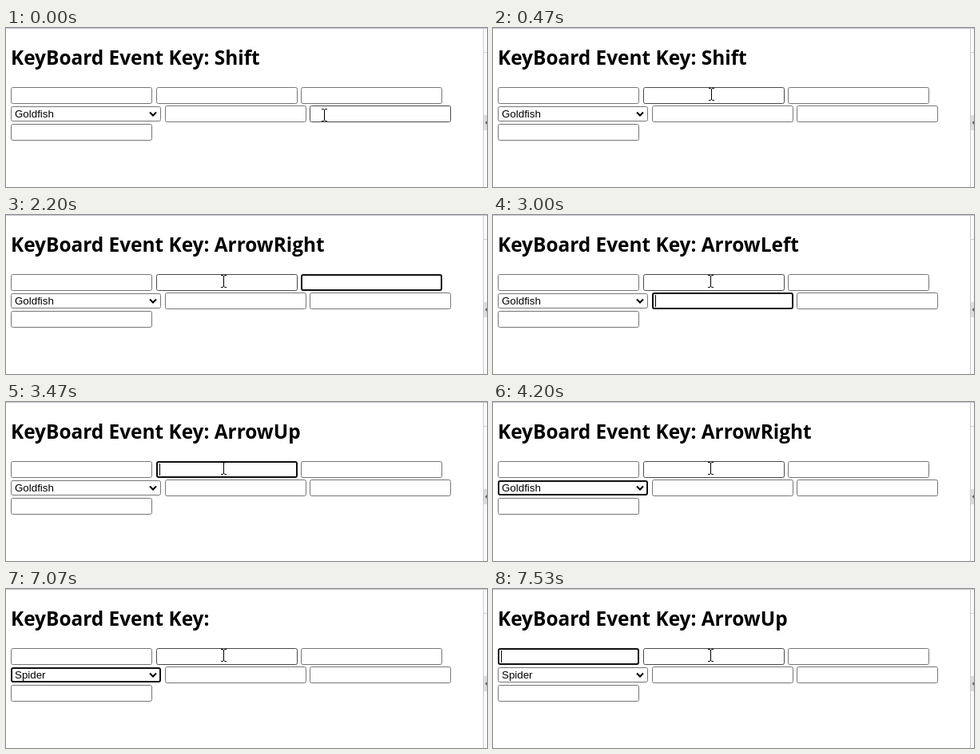
Animation of 602x199 px, one loop 8000 ms. Source, as an HTML page:

```html
<!DOCTYPE html>
<html lang="en">
<head>
<meta charset="utf-8">
<title>Keyboard focus navigation</title>
<style>
  html, body { margin: 0; width: 100%; height: 100%; overflow: hidden; background: #fff; }
  svg { display: block; }
  text { font: 13.333px "Liberation Sans", Arial, sans-serif; white-space: pre; }
  #title { font: bold 24.4px "Open Sans", "Noto Sans", sans-serif; }
  .field { fill: #fff; stroke: #767676; }
  .hover { stroke: #4a4a4a; }
  .focus { stroke: #101010; stroke-width: 2; }
  #popup rect { fill: #fff; stroke: #767676; filter: drop-shadow(0 1px 2px rgba(0, 0, 0, .5)); }
</style>
</head>
<body>
<svg width="602" height="199" viewBox="0 0 602 199">
  <rect width="602" height="199" fill="#fff"/>
  <g id="panel">
    <rect x="598" width="4" height="199" fill="#fafafc"/>
    <rect x="598" y="30" width="4" height="1" fill="#d0d0dc"/>
    <rect x="598" y="109" width="4" height="19" fill="#dcdcdc"/>
    <path d="M602 116v5l-2.500-2.500z" fill="#666"/>
    <rect x="597" width="1" height="199" fill="#c8c8d4"/>
    <rect width="602" height="1" fill="#c4c4d4"/>
  </g>
  <text id="title" x="6" y="46"></text>
  <g id="fields"></g>
  <text id="value" x="11" y="112"></text>
  <path d="M180 105.500l4 4 4-4" fill="none" stroke="#000" stroke-width="2"/>
  <rect id="caret" width="1" height="15"/>
  <g id="popup"><rect x="6.500" y="117.500" width="187" height="100"/></g>
  <path id="cursor" d="M-3-7.500h2l1.500 1 1.500-1h2M.500-6.500v13M-3 7.500h2l1.500-1 1.500 1h2" fill="none" stroke="#000"/>
</svg>
<script>
const LOOP = 8000, BLINK = 530, SELECT = 3;
const $ = id => document.getElementById(id);

function add(parent, tag, attrs, text = '') {
  const el = document.createElementNS('http://www.w3.org/2000/svg', tag);
  for (const name in attrs) el.setAttribute(name, attrs[name]);
  el.textContent = text;
  return parent.appendChild(el);
}

const boxes = [
  [6, 74], [188, 74], [369, 74],
  [6, 98, 188, 19], [199, 97], [380, 97],
  [6, 120]
].map(([x, y, w = 177, h = 21]) => ({ x, y, w, h, el: add($('fields'), 'rect', { rx: 2 }) }));

['--Please choose an option--', 'Dog', 'Cat', 'Hamster', 'Parrot'].forEach((label, i) =>
  add($('popup'), 'text', { x: 11, y: Math.round(130 + i * 16.5) }, label));

// [start, focused field, last key, select value, popup open]
const states = [
  [0, -1, 'Shift'],
  [530, 1, 'Shift'],
  [1670, 2, 'ArrowRight'],
  [2470, 5, 'ArrowDown'],
  [3000, 4, 'ArrowLeft'],
  [3470, 1, 'ArrowUp'],
  [3800, 2, 'ArrowRight'],
  [4200, SELECT, 'ArrowRight'],
  [5470, -1, '', 'Goldfish', true],
  [7070, SELECT, '', 'Spider'],
  [7530, 0, 'ArrowUp', 'Spider']
];

function cursorAt(t) {
  if (t >= 530) return [272, 83];
  const p = Math.min(1, Math.floor((t + 1) / 67) / 7);
  const eased = p * p * (3 - 2 * p);
  return [Math.round(398 - 125 * eased), Math.round(109 - 26 * eased)];
}

function render(t) {
  const [start, focus, key, value = 'Goldfish', open = false] =
    states.filter(state => state[0] <= t).pop();
  const [mx, my] = cursorAt(t);

  $('title').textContent = 'KeyBoard Event Key: ' + key;
  $('value').textContent = value;
  $('popup').style.display = open ? '' : 'none';
  $('cursor').setAttribute('transform', `translate(${mx} ${my})`);

  boxes.forEach(({ x, y, w, h, el }, i) => {
    const focused = i === focus;
    const hovered = mx >= x && mx < x + w && my >= y && my < y + h;
    const inset = focused ? 1 : 0.5;
    el.setAttribute('class', 'field' + (focused ? ' focus' : hovered ? ' hover' : ''));
    el.setAttribute('x', x + inset);
    el.setAttribute('y', y + inset);
    el.setAttribute('width', w - 2 * inset);
    el.setAttribute('height', h - 2 * inset);
  });

  const typing = focus >= 0 && focus !== SELECT;
  const lit = typing && Math.floor((t - start) / BLINK) % 2 === 0;
  $('caret').style.display = lit ? '' : 'none';
  if (lit) {
    $('caret').setAttribute('x', boxes[focus].x + 4);
    $('caret').setAttribute('y', boxes[focus].y + 3);
  }
}

function tick() {
  render(performance.now() % LOOP);
  requestAnimationFrame(tick);
}
tick();
</script>
</body>
</html>
```
